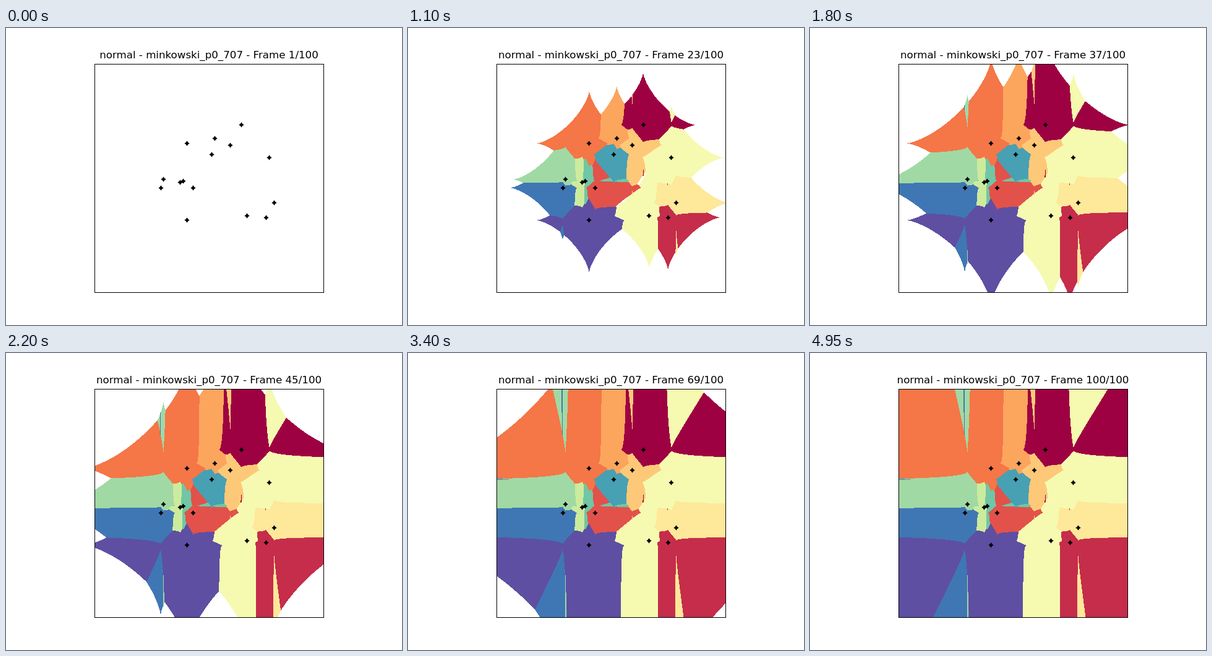
These frames come from a looping animation (640 px wide and 480 px high, 5000 ms). An HTML page with a canvas:

```html
<!DOCTYPE html>
<html lang="en">
<head>
<meta charset="utf-8">
<title>Minkowski growth</title>
<style>
  html, body { margin: 0; width: 100%; height: 100%; overflow: hidden; background: #fff; }
  canvas, svg { position: absolute; left: 0; top: 0; }
  text { font: 16.667px "DejaVu Sans", sans-serif; text-anchor: middle; }
</style>
</head>
<body>
<canvas id="stage" width="640" height="480"></canvas>
<svg width="640" height="480" viewBox="0 0 640 480">
  <text id="title" x="328" y="49"></text>
  <rect x="143.5" y="58.5" width="370" height="369" fill="none" stroke="#000" shape-rendering="crispEdges"/>
  <g id="marks" stroke="#000" stroke-width="1.39" stroke-linejoin="round"></g>
</svg>
<script>
const P = 0.707, STEPS = 100, STEP_MS = 50, GROWTH = 3.7;
const LEFT = 144, TOP = 59, W = 369, H = 368;

// x, y, colour
const seeds = [
  [379.5, 156.3, 0x9e0142],
  [419.6, 305.7, 0xc52d4b],
  [302.0, 257.7, 0xe2524a],
  [292.4, 185.9, 0xf57647],
  [336.8, 177.8, 0xfca55d],
  [361.9, 188.9, 0xfdc978],
  [432.9, 281.9, 0xfee899],
  [425.3, 208.9, 0xf5fab0],
  [389.4, 303.4, 0xf5fab0],
  [281.3, 249.4, 0xcdeb9d],
  [253.9, 244.3, 0xa1d9a4],
  [286.4, 246.5, 0x70c6a5],
  [331.9, 203.8, 0x48a0b3],
  [249.5, 257.8, 0x3f77b5],
  [292.3, 310.2, 0x5e4fa2]
];

const ctx = document.getElementById("stage").getContext("2d");
const title = document.getElementById("title");
const image = ctx.createImageData(W, H);
const pixels = new Uint32Array(image.data.buffer);
const fill = new Uint32Array(W * H);
const birth = new Uint16Array(W * H);

const abgr = c => (0xff000000 | (c & 255) << 16 | (c & 0xff00) | c >> 16) >>> 0;
const powers = (from, n, centre) =>
  Float64Array.from({ length: n }, (_, i) => Math.abs(from + i - centre) ** P);

// Nearest seed for each pixel, and the step at which it is reached
function buildCells() {
  const cols = seeds.map(s => powers(LEFT, W, s[0]));
  const rows = seeds.map(s => powers(TOP, H, s[1]));
  const colours = seeds.map(s => abgr(s[2]));
  for (let y = 0, i = 0; y < H; y++) {
    for (let x = 0; x < W; x++, i++) {
      let best = Infinity, owner = 0;
      for (let s = 0; s < seeds.length; s++) {
        const d = cols[s][x] + rows[s][y];
        if (d < best) { best = d; owner = s; }
      }
      fill[i] = colours[owner];
      birth[i] = Math.ceil(best ** (1 / P) / GROWTH);
    }
  }
}

function drawMarks() {
  const r = 3.2, q = 1.15;
  const star = `M0 ${-r}L${q} ${-q} ${r} 0 ${q} ${q} 0 ${r} ${-q} ${q} ${-r} 0 ${-q} ${-q}Z`;
  document.getElementById("marks").innerHTML = seeds.map(([x, y]) =>
    `<path d="${star}" transform="translate(${Math.round(x) + 0.5} ${Math.round(y) + 0.5})"/>`).join("");
}

let shown = 0;
function render(step) {
  if (step === shown) return;
  shown = step;
  for (let i = 0; i < pixels.length; i++) {
    pixels[i] = birth[i] <= step ? fill[i] : 0xffffffff;
  }
  ctx.putImageData(image, LEFT, TOP);
  title.textContent = `normal - minkowski_p0_707 - Frame ${step}/${STEPS}`;
}

buildCells();
drawMarks();
render(1);

const start = performance.now();
function tick() {
  const t = Math.max(0, performance.now() - start);
  render(Math.floor(t / STEP_MS) % STEPS + 1);
  requestAnimationFrame(tick);
}
requestAnimationFrame(tick);
</script>
</body>
</html>
```
